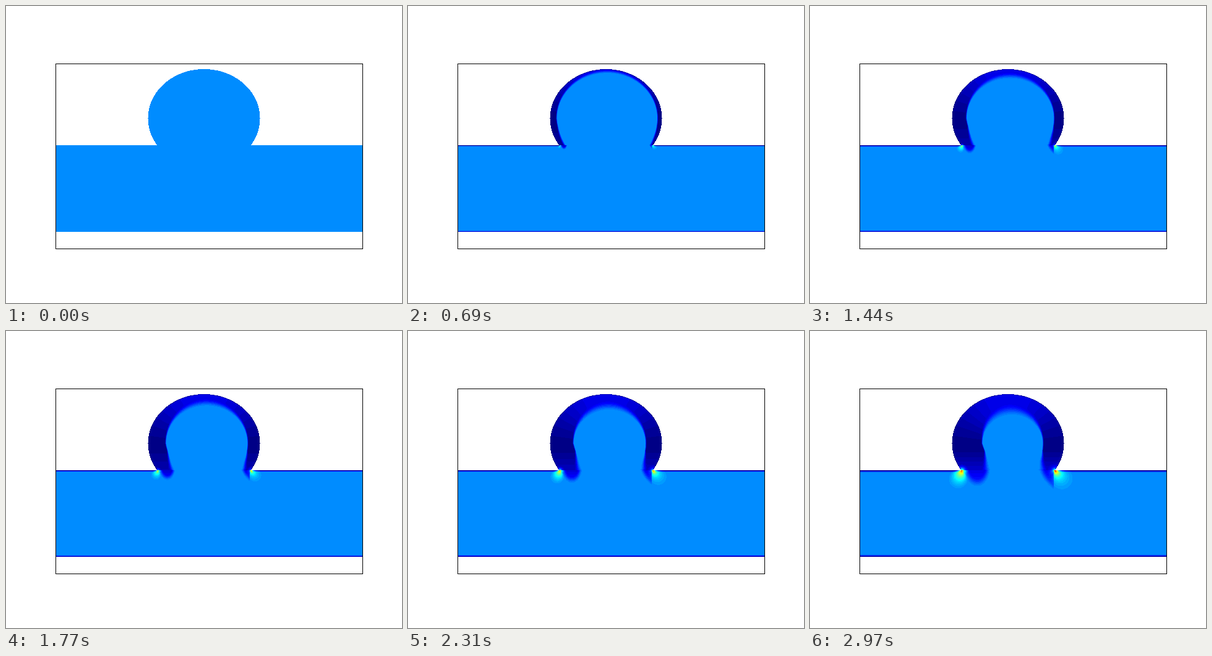
An HTML page with a canvas that plays this animation: 640 by 480 pixels, repeating every 3000 ms.

```html
<!DOCTYPE html>
<html lang="en">
<head>
<meta charset="utf-8">
<title>Flow past a round cavity</title>
<style>
  html, body { margin: 0; width: 100%; height: 100%; overflow: hidden; background: #fff; }
  canvas { display: block; width: 640px; height: 480px; }
</style>
</head>
<body>
<canvas id="stage" width="640" height="480"></canvas>
<script>
const ctx = document.getElementById('stage').getContext('2d');
const LOOP = 3000, STEP = 30;
const X0 = 81, X1 = 576, Y0 = 102, Y1 = 365;      // plotted area
const TOP = 225, BOTTOM = 364;                    // channel walls
const CX = 319.5, CY = 181, RX = 90.5, RY = 79.5; // cavity ellipse
const BASE = 0.262, BAND = 0.016;

const clamp = (v, lo = 0, hi = 1) => Math.min(hi, Math.max(lo, v));
const smooth = v => { v = clamp(v); return v * v * (3 - 2 * v); };
const mix = (a, b, k) => a + (b - a) * k;

// Jet colour map, value 0..1
function jet(v) {
  const ch = c => Math.round(255 * clamp(1.5 - Math.abs(4 * v - c)));
  return [ch(3), ch(2), ch(1)];
}

// Bands are counted from the resting value, so calm fluid keeps its exact colour
const LOW = -Math.ceil(BASE / BAND);
const palette = [];
for (let i = LOW; BASE + i * BAND <= 1; i++) palette.push(jet(Math.max(0, BASE + i * BAND)));
const colour = v => palette[clamp(Math.round((v - BASE) / BAND) - LOW, 0, palette.length - 1)];

// Size of the circle through a corner, tangent to the wall across (nx, ny)
function lobe(dx, dy, nx, ny) {
  const r2 = dx * dx + dy * dy;
  const along = dx * nx + dy * ny;
  const near = Math.sqrt(r2) * 3;
  return along > 0 ? Math.min(r2 / along, near) : near;
}

function glow(x, y, u) {
  const amp = 0.15 + 0.45 * u;
  if (x < CX) {
    const d = lobe(x - 245, y - 225, -0.4, 0.917);
    return Math.max(0, amp * Math.exp(-d / (12 * u)) - 0.04);
  }
  const d = lobe(x - 395.5, y - 225, 0.65, 0.76);
  return Math.max(0, amp * Math.exp(-d / (7 * u)) + 0.06 * (1 - d / (37 * u)));
}

// Slow layer inside the cavity
function cavity(x, y, u) {
  let depth, blend, floor;
  if (y <= CY) {
    const left = CX - RX + 50 * u, right = CX + RX - 35 * u;
    const a = (right - left) / 2, b = RY - 36 * Math.pow(u, 1.1);
    const e = Math.hypot((x - (left + right) / 2) / a, (y - CY) / b);
    const px = (x - CX) / RX, py = (CY - y) / RY;
    const c = py / (Math.hypot(px, py) || 1);
    depth = (e - 1) * mix(a, b, c);
    blend = 2 + 18 * u * c * c;
    floor = 0.008 + 0.1 * Math.pow(c, 1.5);
  } else {
    const half = RX * Math.sqrt(1 - ((y - CY) / RY) ** 2);
    const bump = 4 * u * Math.sin(Math.PI * clamp((y - CY) / 42));
    const taper = 1 - 0.17 * clamp((y - 205) / 17) ** 2;
    const fromLeft = CX - half + 50 * u + bump - x;
    const fromRight = x - (CX + half - 35 * u * taper);
    const neck = clamp((y - 193) / 32);
    depth = Math.max(fromLeft, fromRight);
    blend = 2 + 15 * u * neck;
    floor = 0.008 + 0.07 * u * neck;
  }
  return mix(BASE, floor, smooth(depth / blend));
}

// Slow fluid spilling from the two corners into the channel
function spill(x, y, u) {
  const floor = 0.02 + 0.07 * u;
  let k = 0;
  if (x < CX) {
    const h = (y - 221) / (5 + 27 * u);
    const e = Math.hypot((x - 246 - 24 * u) / (1 + 21 * u), h);
    if (e < 1) k = smooth((1 - e) * 2) * (1 - 0.45 * h);
  } else if (x <= 393) {
    const h = (y - 218) / (5 + 35 * u);
    if (h < 1) {
      const depth = x - (393 - 25 * u * (1 - h * h));
      k = smooth(depth / (2 + 10 * u)) * (1 - 0.8 * h);
    }
  }
  return mix(BASE, floor, k);
}

function field(x, y, u) {
  const active = x > 195 && x < 450 && y < 275;
  const g = active ? glow(x, y, u) : 0;
  if (y < TOP) {
    const rim = Math.hypot((x - CX) / (RX - 1), (y - CY) / (RY - 1)) > 1;
    return cavity(x, y, u) + g - (rim ? 0.06 : 0);
  }
  let v = active ? spill(x, y, u) : BASE;
  const w = 0.5 + 1.2 * u;
  const wall = d => d < 6 ? Math.exp(-((d / w) ** 2)) : 0;
  const upper = x < 245 || x > 395 ? wall(y - TOP) : 0;
  const lower = wall(BOTTOM - y) * (0.55 + 0.4 * u);
  const line = Math.min(1, u * 9) * Math.max(upper, lower);
  v *= 1 - line * (1 - Math.min(1, g * 3));
  return v + g;
}

const image = ctx.createImageData(X1 - X0, Y1 - Y0);

function draw(u) {
  const data = image.data;
  let p = 0;
  for (let y = Y0; y < Y1; y++) {
    for (let x = X0; x < X1; x++, p += 4) {
      const inside = y >= TOP || Math.hypot((x - CX) / RX, (y - CY) / RY) <= 1;
      const [r, g, b] = !inside ? [255, 255, 255] : colour(u ? field(x, y, u) : BASE);
      data[p] = r;
      data[p + 1] = g;
      data[p + 2] = b;
      data[p + 3] = 255;
    }
  }
  ctx.putImageData(image, X0, Y0);
}

ctx.fillStyle = '#fff';
ctx.fillRect(0, 0, 640, 480);
ctx.strokeStyle = '#000';
ctx.strokeRect(80.5, 93.5, 496, 299);

const start = performance.now();
let shown = -1;
function tick() {
  const step = Math.floor(((performance.now() - start) % LOOP) / STEP);
  if (step !== shown) {
    shown = step;
    draw(step * STEP / LOOP);
  }
  requestAnimationFrame(tick);
}
tick();
</script>
</body>
</html>
```
